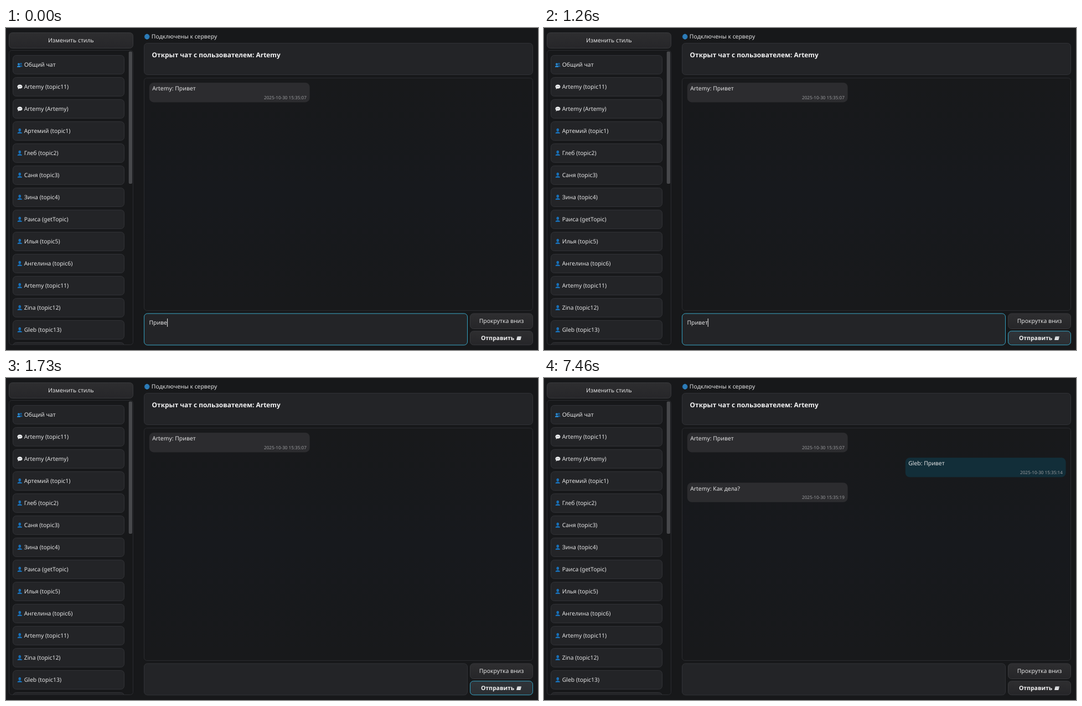
An HTML page for the animation above (8000 ms loop, 961x583 px).

```html
<!DOCTYPE html>
<html lang="ru">
<head>
<meta charset="utf-8">
<title>Чат</title>
<style>
html, body { margin: 0; width: 100%; height: 100%; overflow: hidden; background: #17181a; }
svg { display: block; width: 961px; height: 583px; }
text { font: 10.4px "Noto Sans", sans-serif; fill: #e6e6e7; white-space: pre; text-rendering: geometricPrecision; }
.title { font-size: 11.9px; font-weight: 700; fill: #f4f4f5; }
.bold { font-size: 10.5px; font-weight: 700; fill: #f4f4f5; }
.time { font-size: 8.15px; fill: #9b9c9f; text-anchor: end; }
.mid { text-anchor: middle; }
.box { fill: #232427; stroke: #313236; }
.frame { fill: none; stroke: #2b2c30; }
.focus { fill: none; stroke: #329fbe; }
.anim { animation: 8s step-end infinite; }
.draft1 { animation-name: draft1; }
.draft2 { animation-name: draft2; }
.caret { animation-name: caret; }
.field { animation-name: field; }
.hover { animation-name: hover; }
.press { animation-name: press; }
.sent { animation-name: sent; }
.reply { animation-name: reply; }
@keyframes draft1 { 0% { opacity: 1 } .75%, 100% { opacity: 0 } }
@keyframes draft2 { 0% { opacity: 0 } .75% { opacity: 1 } 21.625%, 100% { opacity: 0 } }
@keyframes caret {
  0% { transform: none; opacity: 1 }
  .75% { transform: translateX(4.7px); opacity: 1 }
  8.25% { transform: translateX(4.7px); opacity: 0 }
  15.75% { transform: translateX(4.7px); opacity: 1 }
  20.75%, 100% { transform: translateX(4.7px); opacity: 0 }
}
@keyframes field { 0% { opacity: 1 } 20.75%, 100% { opacity: 0 } }
@keyframes hover { 0% { opacity: 0 } 15.75% { opacity: 1 } 23.25%, 100% { opacity: 0 } }
@keyframes press { 0% { opacity: 0 } 20.75% { opacity: 1 } 21.625%, 100% { opacity: 0 } }
@keyframes sent { 0% { opacity: 0 } 23.25%, 100% { opacity: 1 } }
@keyframes reply { 0% { opacity: 0 } 93.25%, 100% { opacity: 1 } }
</style>
</head>
<body>
<svg viewBox="0 0 961 583">
  <defs>
    <linearGradient id="btn" x2="0" y2="1">
      <stop stop-color="#2e2e30"/><stop offset="1" stop-color="#262629"/>
    </linearGradient>
    <linearGradient id="lit" x2="0" y2="1">
      <stop stop-color="#303439"/><stop offset="1" stop-color="#2a2e32"/>
    </linearGradient>
    <linearGradient id="pane" x2="0" y2="1">
      <stop stop-color="#18191b"/><stop offset=".5" stop-color="#17191d"/><stop offset="1" stop-color="#18191b"/>
    </linearGradient>
    <clipPath id="view"><rect x="6" y="41" width="223" height="532.5" rx="5"/></clipPath>
    <g id="user" fill="#1870b8">
      <ellipse cx="24.8" cy="-1.9" rx="2.3" ry="2.8"/>
      <path d="M20.8 4.4V3.5Q21.1 1.6 24.8 1.4Q28.5 1.6 28.8 3.5V4.4Z"/>
    </g>
    <g id="users">
      <g fill="#155a94"><circle cx="27" cy="-1.6" r="1.8"/><path d="M24 3.8Q24.2 1.1 27 1Q29.6 1.1 29.7 3.8Z"/></g>
      <g fill="#2a8ad2"><circle cx="23" cy="-1" r="2"/><path d="M20 4.4Q20.1 1.7 23 1.6Q26 1.7 26.1 4.4Z"/></g>
    </g>
    <g id="talk" transform="translate(2.5) scale(.9)">
      <path d="M25 -4.4C28 -4.4 30 -2.7 30 -.4C30 2 28 3.4 25 3.4L23.8 3.3Q22.6 4.5 20.8 4.6Q21.8 3.5 21.7 2.6Q20 1.5 20 -.4C20 -2.7 22 -4.4 25 -4.4Z" fill="#f1f2f3"/>
      <g fill="#4e5560"><circle cx="22.8" cy="-.5" r=".75"/><circle cx="25" cy="-.5" r=".75"/><circle cx="27.2" cy="-.5" r=".75"/></g>
    </g>
  </defs>

  <rect width="961" height="583" fill="#17181a"/>

  <rect x="5.5" y="8.5" width="224" height="28" rx="6" fill="url(#btn)" stroke="#38393c"/>
  <text class="mid" x="117.4" y="25.8">Изменить стиль</text>
  <rect class="frame" x="5.5" y="40.5" width="224" height="533" rx="5"/>
  <g clip-path="url(#view)">
    <g id="list"></g>
    <rect x="221.7" y="42.5" width="6.3" height="239.5" rx="2" fill="#47484b"/>
  </g>

  <g fill="none" stroke="#5ba6d8" stroke-width=".45">
    <circle cx="254.7" cy="15.7" r="4.6" fill="#1564a4" stroke="#2478b6"/>
    <ellipse cx="254.7" cy="15.7" rx="2.2" ry="4.5"/>
    <path d="M250.2 15.7h9M254.7 11.2v9M250.9 13.2h7.6M250.9 18.2h7.6"/>
  </g>
  <text x="262.8" y="19.3">Подключены к серверу</text>
  <rect class="box" x="249.5" y="27.5" width="702" height="57" rx="6"/>
  <text class="title" x="263.6" y="53">Открыт чат с пользователем: Artemy</text>

  <rect x="249.5" y="90.5" width="702" height="421" rx="5" fill="url(#pane)" stroke="#2b2c30"/>
  <g id="chat"></g>

  <rect class="box" x="249.5" y="517" width="584" height="57" rx="6"/>
  <rect class="focus anim field" x="249.5" y="517" width="584" height="57" rx="6"/>
  <text class="anim draft1" x="258.4" y="537.2">Приве</text>
  <text class="anim draft2" x="258.4" y="537.2">Привет</text>
  <rect class="anim caret" x="291.1" y="526" width="1" height="15" fill="#f0f0f0"/>

  <rect x="838.5" y="517" width="113" height="27.5" rx="6" fill="url(#btn)" stroke="#38393c"/>
  <text class="mid" x="895" y="534.4">Прокрутка вниз</text>
  <rect x="838.5" y="548.8" width="113" height="25" rx="6" fill="url(#btn)" stroke="#38393c"/>
  <rect class="anim hover" x="838.5" y="548.8" width="113" height="25" rx="6" fill="url(#lit)"/>
  <rect class="anim press" x="838.5" y="548.8" width="113" height="25" rx="6" fill="#222528"/>
  <rect class="focus anim hover" x="838.5" y="548.8" width="113" height="25" rx="6"/>
  <text class="bold" x="857.9" y="565.3">Отправить</text>
  <path d="M923.6 558.6H931L929.4 565H922Z" fill="#e4e6e8"/>
  <path d="M924 559L926.8 562.1L930.6 559" fill="none" stroke="#8e9498" stroke-width=".6"/>
</svg>
<script>
const contacts = [
  ["users", "Общий чат"],
  ["talk", "Artemy (topic11)"],
  ["talk", "Artemy (Artemy)"],
  ["user", "Артемий (topic1)"],
  ["user", "Глеб (topic2)"],
  ["user", "Саня (topic3)"],
  ["user", "Зина (topic4)"],
  ["user", "Раиса (getTopic)"],
  ["user", "Илья (topic5)"],
  ["user", "Ангелина (topic6)"],
  ["user", "Artemy (topic11)"],
  ["user", "Zina (topic12)"],
  ["user", "Gleb (topic13)"],
  ["user", ""]
];
document.getElementById("list").innerHTML = contacts.map(([icon, name], i) => {
  const y = 49.5 + i * 40;
  return `<rect class="box" x="12.5" y="${y}" width="201" height="34" rx="6"/>
    <use href="#${icon}" y="${y + 17}"/><text x="32.7" y="${y + 20.4}">${name}</text>`;
}).join("");

const bubble = (row, x, fill, text, time, cls = "") => {
  const y = 99 + row * 45.2;
  return `<g class="${cls}"><rect x="${x}" y="${y}" width="289.8" height="35.4" rx="8" fill="${fill}"/>
    <text x="${x + 5.4}" y="${y + 14.2}">${text}</text>
    <text class="time" x="${x + 284}" y="${y + 29.9}">2025-10-30 ${time}</text></g>`;
};
document.getElementById("chat").innerHTML =
  bubble(0, 258.8, "#2c2c2f", "Artemy: Привет", "15:35:07") +
  bubble(1, 652.8, "#122e39", "Gleb: Привет", "15:35:14", "anim sent") +
  bubble(2, 258.8, "#2c2c2f", "Artemy: Как дела?", "15:35:19", "anim reply");
</script>
</body>
</html>
```
